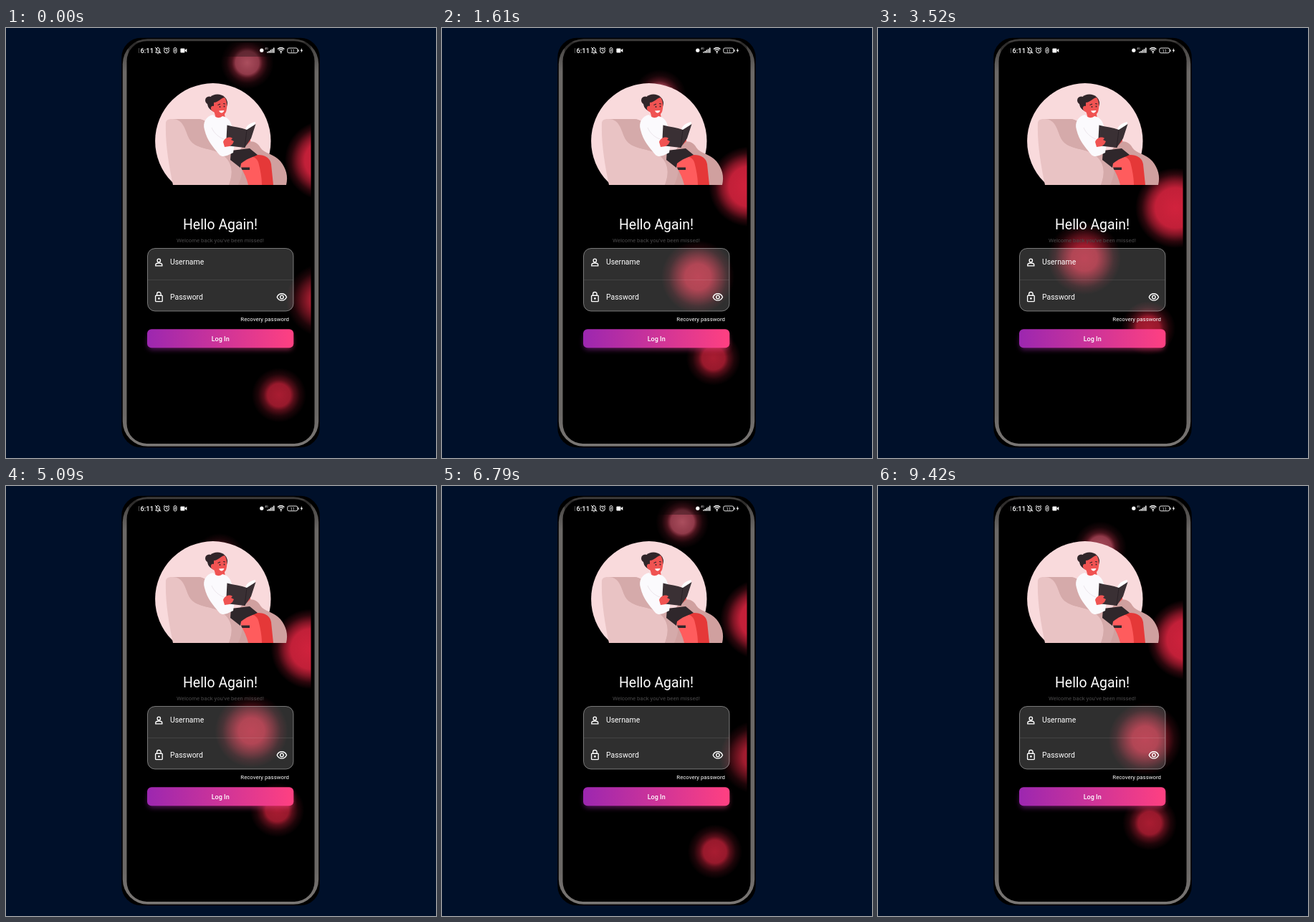
Recreate the animation shown at these times as an HTML page. Size 600x600 px, loop 9450 ms.

```html
<!DOCTYPE html>
<html lang="en">
<head>
<meta charset="utf-8">
<title>Login screen</title>
<style>
  html, body { margin: 0; width: 100%; height: 100%; overflow: hidden; background: #00102a; }
  svg { display: block; width: 100%; height: 100%; }
  text { font-family: Roboto, sans-serif; fill: #fff; }
  .line { fill: none; stroke: #fff; }
</style>
</head>
<body>
<svg viewBox="0 0 600 600">
  <defs>
    <linearGradient id="metal" x2="0" y2="1">
      <stop offset="0" stop-color="#3c3a39"/>
      <stop offset=".08" stop-color="#6b6866"/>
      <stop offset=".92" stop-color="#6b6866"/>
      <stop offset="1" stop-color="#7a7775"/>
    </linearGradient>
    <linearGradient id="button">
      <stop offset="0" stop-color="#9c27b0"/>
      <stop offset="1" stop-color="#ff4081"/>
    </linearGradient>
    <radialGradient id="small">
      <stop offset="0" stop-color="#d8243f" stop-opacity=".78"/>
      <stop offset=".42" stop-color="#d8243f" stop-opacity=".7"/>
      <stop offset=".56" stop-color="#d8243f" stop-opacity=".4"/>
      <stop offset=".77" stop-color="#d8243f" stop-opacity=".14"/>
      <stop offset="1" stop-color="#d8243f" stop-opacity="0"/>
    </radialGradient>
    <radialGradient id="pale">
      <stop offset="0" stop-color="#c85c6e" stop-opacity=".85"/>
      <stop offset=".44" stop-color="#c85066" stop-opacity=".72"/>
      <stop offset=".58" stop-color="#c0344c" stop-opacity=".38"/>
      <stop offset=".78" stop-color="#b02840" stop-opacity=".13"/>
      <stop offset="1" stop-color="#b02840" stop-opacity="0"/>
    </radialGradient>
    <radialGradient id="big">
      <stop offset="0" stop-color="#dc2440" stop-opacity=".95"/>
      <stop offset=".5" stop-color="#dc2440" stop-opacity=".88"/>
      <stop offset=".67" stop-color="#dc2440" stop-opacity=".58"/>
      <stop offset=".84" stop-color="#dc2440" stop-opacity=".2"/>
      <stop offset="1" stop-color="#dc2440" stop-opacity="0"/>
    </radialGradient>
    <radialGradient id="soft">
      <stop offset="0" stop-color="#d8263f" stop-opacity=".8"/>
      <stop offset=".35" stop-color="#d8263f" stop-opacity=".74"/>
      <stop offset=".6" stop-color="#d8263f" stop-opacity=".42"/>
      <stop offset=".8" stop-color="#d8263f" stop-opacity=".14"/>
      <stop offset="1" stop-color="#d8263f" stop-opacity="0"/>
    </radialGradient>
    <filter id="glow" x="-10%" y="-60%" width="120%" height="220%"><feGaussianBlur stdDeviation="3.5"/></filter>
    <clipPath id="screen"><path d="M171 20H425.5V580H171Z"/></clipPath>
    <clipPath id="floor"><path d="M190 60H410V219H190Z"/></clipPath>
    <clipPath id="clock"><path d="M185.6 20H230V42H185.6Z"/></clipPath>
  </defs>

  <rect width="600" height="600" fill="#00102a"/>

  <!-- phone -->
  <rect x="161.3" y="13.8" width="276.4" height="571.4" rx="27"/>
  <rect x="162.8" y="15.2" width="273.4" height="568.6" rx="35" fill="url(#metal)"/>
  <rect x="168.5" y="18.2" width="262" height="561.8" rx="28"/>

  <g clip-path="url(#screen)">
    <g id="blobs"></g>
    <rect x="171" y="18" width="255" height="22" opacity=".33"/>
  </g>

  <!-- illustration -->
  <g clip-path="url(#floor)">
    <circle cx="288.8" cy="157.8" r="80.7" fill="#f9dadc"/>
    <path fill="#d5aaaa" d="M232 127H268C283 128 286 140 292 152C300 166 322 172 336 178L334 219H240Z"/>
    <path fill="#d0a09f" d="M334 160C342 156 351 159 355 167C360 175 375 176 383 186C391 196 394 207 391 219H318L322 176Z"/>
    <path fill="#e9c3c4" d="M223 133C223 129 226 127 231 127C246 126 249 139 254 151C262 171 286 166 301 176C318 187 317 204 311 219H233C227 190 222 160 223 133Z"/>
    <path fill="#d5aaaa" d="M247 127H268C284 128 286 141 293 153C301 167 322 171 328 187C332 199 328 210 324 219H311C317 203 317 187 301 176C286 166 262 171 254 151C250 140 250 132 238 127Z"/>
    <!-- legs -->
    <path fill="#e53838" d="M338 180C352 174 368 177 370 190L373 219H354Z"/>
    <path fill="#ff5c5d" d="M326 185C340 176 351 178 353 191C356 203 357 212 357 219H338C336 210 332 202 328 195Z"/>
    <path fill="#2f272b" d="M314 171L340 168L351 177C342 181 335 183 328 189L327 195L313 184Z"/>
    <path fill="#2f272b" d="M328 194.5H340V198H329.5Z"/>
    <!-- torso -->
    <path fill="#f05352" d="M290 115H304L306 126L294 130Z"/>
    <path fill="#fbfafd" d="M289 121C279 123 274 132 277 142C281 158 289 166 297 176C302 182 309 178 317 174L319 160L312 152L315 137C313 127 307 124 302 123C297 127 292 125 289 121Z"/>
    <path fill="none" stroke="#e7dfe6" stroke-width=".8" d="M287 139C290 147 298 153 304 155"/>
    <!-- head -->
    <circle cx="283.5" cy="101" r="5.5" fill="#302529"/>
    <ellipse cx="295" cy="105" rx="14" ry="12.5" fill="#302529"/>
    <path fill="#f05352" d="M290 104C296 104 299 98 305 97C309 102 309 111 307 117C304 124 295 124 290 117C284 115 285 107 290 109Z"/>
    <path fill="none" stroke="#302529" stroke-width="1.1" d="M295.5 107.5L299 106M303 105.5L306 106"/>
    <circle cx="298.5" cy="110" r=".9" fill="#302529"/>
    <circle cx="304.5" cy="109.5" r=".9" fill="#302529"/>
    <path fill="#fff" d="M297 115.5L304.5 115C303 119.5 299 119.5 297 115.5Z"/>
    <!-- book -->
    <path fill="#f05352" d="M335 152L341 149V158L336 163Z"/>
    <path fill="#fff" d="M334 140.5C337 135 342 132 348 131L347 137L336 144Z"/>
    <path fill="#3a3034" d="M308.5 135.5C318 138 328 139 336 142L348.5 134L342 154L333 167L307 164Z"/>
    <path fill="none" stroke="#251e22" stroke-width=".8" d="M336 142L333 167"/>
    <path fill="#f05352" d="M303 159C305 153 312 151 316 154L314 156L318 158L316 162L312 165L305 166Z"/>
  </g>

  <!-- status bar -->
  <g id="status">
    <text x="182.2" y="34.6" font-size="9.4" font-weight="500" clip-path="url(#clock)">16:11</text>
    <g class="line" stroke-width="1">
      <path d="M208.7 34.2H215.3L214.3 32.5V30Q214 27.5 212 27.5Q209.8 27.5 209.8 30V32.5L208.7 34.2M211.3 35.8H212.8M208 27L216 35.5"/>
      <circle cx="224" cy="31.6" r="3.4"/>
      <path d="M224 29.6V31.8L225.5 32.6M219.7 28.8L221.8 27M228.3 28.8L226.2 27"/>
      <rect x="234" y="27.5" width="4" height="7.5" rx="2" stroke-width=".9"/>
      <path d="M235 30H237.2L235 32.3H237.2" stroke-width=".7"/>
      <path d="M379 29.4Q383.7 25.6 388.4 29.4M380.7 31.2Q383.7 28.7 386.7 31.2M382.3 33Q383.7 31.9 385.1 33" stroke-width="1.3"/>
      <rect x="392.8" y="28" width="14" height="6.8" rx="2" stroke-width=".9"/>
    </g>
    <g fill="#fff">
      <rect x="243.4" y="28.4" width="6" height="6" rx="1"/>
      <path d="M249.5 31L252.3 28.8V34L249.5 31.8Z"/>
      <circle cx="356.8" cy="31.2" r="2.6"/>
      <path d="M364.2 34.8V33.2H365.7V34.8ZM366.4 34.8V32H367.9V34.8ZM368.6 34.8V30.6H370.1V34.8ZM370.8 34.8V29.2H372.3V34.8ZM373 34.8V27.6H374.5V34.8Z"/>
      <circle cx="383.7" cy="34.4" r=".9"/>
      <path d="M407.5 30H408.6V33H407.5ZM413 28L410.6 31.8H412.2L411.6 34.8L414.2 30.8H412.6Z"/>
    </g>
    <text x="361.3" y="30" font-size="3.6">4G</text>
    <text x="399.8" y="33.6" font-size="5.8" text-anchor="middle">11</text>
  </g>

  <text x="299" y="280.5" font-size="19.4" text-anchor="middle">Hello Again!</text>
  <text x="299" y="298.8" font-size="7.75" text-anchor="middle" style="fill:#4b4a4b">Welcome back you've been missed!</text>

  <!-- form -->
  <rect x="197.5" y="307.5" width="203.5" height="87.5" rx="10.5" fill="#fff" fill-opacity=".185" stroke="#fff" stroke-opacity=".42"/>
  <path class="line" d="M198 351.5H400.5" stroke-width=".8" stroke-opacity=".12"/>
  <g class="line" stroke-width="1.35">
    <circle cx="213.3" cy="324.4" r="2.2"/>
    <path d="M208.8 331.8V330.5C208.8 328.6 211.5 328 213.3 328C215.1 328 217.8 328.6 217.8 330.5V331.8Z"/>
    <rect x="208.6" y="373.2" width="9.6" height="8.4" rx=".9"/>
    <path d="M210.6 373V371.2A2.75 2.75 0 0 1 216.1 371.2V373"/>
    <path d="M378.2 375.4C380.9 369.2 388.8 369.2 391.5 375.4C388.8 381.6 380.9 381.6 378.2 375.4Z"/>
    <circle cx="384.9" cy="375.4" r="2.3"/>
  </g>
  <circle cx="213.4" cy="377.4" r="1.3" fill="#fff"/>
  <text x="229" y="330.1" font-size="10.4">Username</text>
  <text x="229" y="378.7" font-size="10.4">Password</text>
  <text x="395" y="409" font-size="7.82" text-anchor="end">Recovery password</text>

  <rect x="198" y="426" width="202" height="23" rx="6" fill="url(#button)" opacity=".5" filter="url(#glow)"/>
  <rect x="197" y="420.2" width="204.3" height="26" rx="6" fill="url(#button)"/>
  <text x="299.2" y="436.6" font-size="9" font-weight="500" text-anchor="middle">Log In</text>
</svg>
<script>
  const LOOP = 9450, HALF = 4020, LEAD = 560;

  // start point, travel, radius, fill
  const blobs = [
    { x: 339, y: 45, dx: -62, dy: 88, r: 37, fill: 'pale' },
    { x: 446, y: 182, dx: -31, dy: 69, r: 56, fill: 'big' },
    { x: 448, y: 382, dx: -160, dy: -61, r: 51, fill: 'soft' },
    { x: 381, y: 516, dx: -4, dy: -97, r: 38, fill: 'small' }
  ];

  const layer = document.getElementById('blobs');
  for (const b of blobs) {
    b.el = document.createElementNS(layer.namespaceURI, 'circle');
    b.el.setAttribute('r', b.r);
    b.el.setAttribute('fill', `url(#${b.fill})`);
    layer.append(b.el);
  }

  // cubic-bezier(.42, 0, .58, 1), solved by bisection
  function easeInOut(x) {
    let lo = 0, hi = 1, s = 0.5;
    for (let i = 0; i < 20; i++) {
      s = (lo + hi) / 2;
      const r = 1 - s;
      if (3 * r * s * (0.42 * r + 0.58 * s) + s ** 3 < x) lo = s;
      else hi = s;
    }
    return s * s * (3 - 2 * s);
  }

  function draw(ms) {
    const phase = ((ms + LEAD) / HALF) % 2;
    const u = easeInOut(phase < 1 ? phase : 2 - phase);
    for (const b of blobs) {
      b.el.setAttribute('cx', b.x + b.dx * u);
      b.el.setAttribute('cy', b.y + b.dy * u);
    }
  }

  const start = performance.now();
  function tick() {
    draw((performance.now() - start) % LOOP);
    requestAnimationFrame(tick);
  }
  tick();
</script>
</body>
</html>
```
